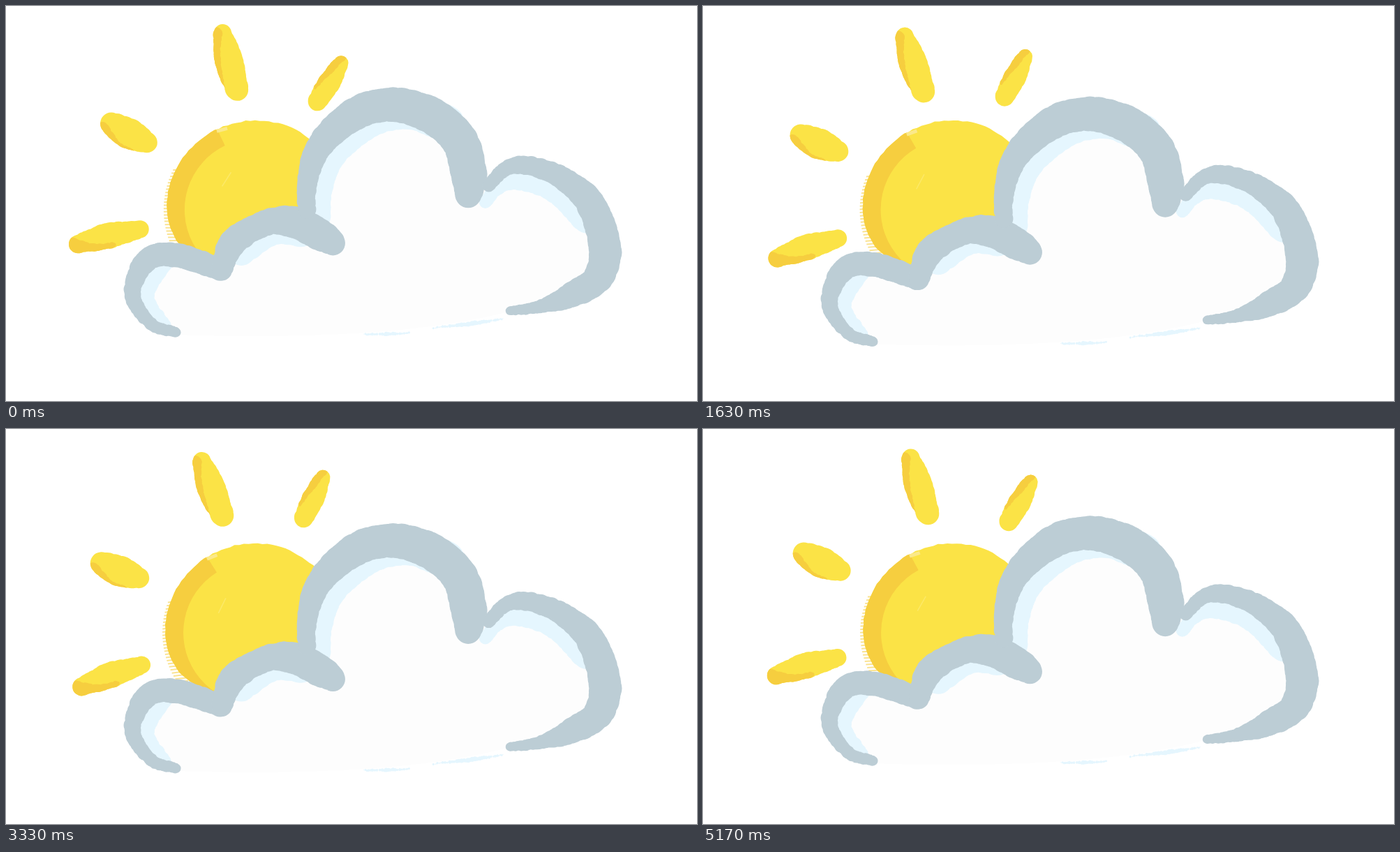
Write an HTML page with a canvas that moves like this. It is 990 by 566 pixels and loops after 5210 ms.

```html
<!DOCTYPE html>
<html lang="en">
<head>
<meta charset="utf-8">
<title>Sun and cloud</title>
<style>
html, body { margin: 0; width: 100%; height: 100%; overflow: hidden; background: #fff; }
canvas { display: block; }
</style>
</head>
<body>
<canvas id="stage" width="990" height="566"></canvas>
<script>
const ctx = document.getElementById('stage').getContext('2d');
const LOOP = 5210, SWING = 872, DROP = 52.4;
const YELLOW = '#fbe346', AMBER = '#f6ce3f', GRAY = '#bccdd5', ICE = '#e5f6fe', WHITE = '#fdfdfd';
const PIVOT = { x: 356, y: 308 };
const SUN = { x: 358, y: 292, r: 128 };

let seed = 7;
const rand = () => (seed = (seed * 16807) % 2147483647) / 2147483647;
const jitter = amount => (rand() * 2 - 1) * amount;

// Smooth curve through a, b, c, d, evaluated between b and c
const spline = (a, b, c, d, u) => b + 0.5 * u * (c - a
  + u * (2 * a - 5 * b + 4 * c - d + u * (3 * (b - c) + d - a)));

// Ragged brush stroke through key points [x, y, width]
function brush(keys) {
  const path = new Path2D();
  const at = i => keys[Math.max(0, Math.min(keys.length - 1, i))];
  for (let i = 0; i < keys.length - 1; i++) {
    const [a, b, c, d] = [at(i - 1), at(i), at(i + 1), at(i + 2)];
    const steps = Math.ceil(Math.hypot(c[0] - b[0], c[1] - b[1]) / 3);
    for (let s = 0; s <= steps; s++) {
      const [x, y, w] = [0, 1, 2].map(k => spline(a[k], b[k], c[k], d[k], s / steps));
      const r = Math.max(0.5, w / 2 + jitter(0.6)), cx = x + jitter(0.6), cy = y + jitter(0.6);
      path.moveTo(cx + r, cy);
      path.arc(cx, cy, r, 0, Math.PI * 2);
    }
  }
  return path;
}

// Nearly round disc, flattened at the lower left
function makeDisc() {
  const path = new Path2D();
  for (let deg = 0; deg < 360; deg += 3) {
    const r = SUN.r - 17 * Math.exp(-(((deg - 135) / 25) ** 2)) + jitter(0.8);
    const a = deg * Math.PI / 180;
    path.lineTo(SUN.x + r * Math.cos(a), SUN.y + r * Math.sin(a));
  }
  path.closePath();
  return path;
}

const disc = makeDisc();

const rays = [
  { body: [[312, 39, 25], [321, 78, 40], [333, 121, 31]],
    side: [[304, 38, 16], [300, 75, 18], [312, 118, 6]] },
  { body: [[482, 83, 21], [464, 112, 31], [447, 138, 26]],
    side: [[482, 72, 16], [455, 100, 14], [444, 118, 4]] },
  { body: [[152, 167, 32], [178, 182, 43], [204, 195, 28]],
    side: [[140, 172, 16], [158, 200, 16], [180, 208, 10]] },
  { body: [[103, 339, 25], [145, 328, 36], [192, 319, 24]],
    side: [[95, 340, 20], [125, 350, 22], [155, 340, 6]] }
].map(({ body, side }) => ({ body: brush(body), side: brush(side) }));

// Cloud outline, left to right
const tail = [[244, 466, 14], [208, 454, 18], [181, 410, 23], [203, 362, 32], [245, 356, 34], [306, 376, 32]];
const small = [[309, 378, 28], [325, 338, 38], [371, 310, 36], [411, 308, 45], [448, 325, 45], [468, 338, 36]];
const big = [[431, 292, 25], [432, 250, 29], [449, 200, 37], [500, 153, 46], [555, 140, 48],
  [610, 156, 52], [650, 192, 52], [663, 240, 51], [662, 270, 37]];
const right = [[692, 256, 18], [715, 232, 21], [745, 227, 26], [791, 242, 31], [837, 281, 41],
  [858, 345, 46], [848, 388, 42], [812, 412, 36], [770, 428, 20], [722, 436, 12]];

function makeInside() {
  const path = new Path2D();
  [...tail, ...small.slice(0, 4), ...big, ...right].forEach(([x, y]) => path.lineTo(x, y));
  path.quadraticCurveTo(560, 480, 244, 470);
  path.closePath();
  return path;
}

// Highlight: part of an outline stroke moved inward
const glow = (keys, from, to, dx, dy) =>
  brush(keys.slice(from, to).map(([x, y, w]) => [x + dx, y + dy, w]));

const inside = makeInside();
const ice = [
  glow(tail, 1, 4, 20, 3),
  glow(small, 1, 4, 12, 13),
  glow(big, 0, 6, 21, 11),
  glow(right, 0, 5, -5, 23),
  brush([[513, 469, 2], [545, 469, 5], [577, 467, 2]]),
  brush([[612, 460, 2], [665, 454, 6], [712, 447, 2]])
];
const outline = [tail, small, big, right].map(brush);

function fill(path, color) {
  ctx.fillStyle = color;
  ctx.fill(path);
}

function line(color, width, x1, y1, x2, y2) {
  ctx.strokeStyle = color;
  ctx.lineWidth = width;
  ctx.beginPath();
  ctx.moveTo(x1, y1);
  ctx.lineTo(x2, y2);
  ctx.stroke();
}

function inClip(path, draw) {
  ctx.save();
  ctx.clip(path);
  draw();
  ctx.restore();
}

function drawDisc() {
  // Dry-brush ticks on the left rim
  for (let y = 234; y < 372; y += 4.6) {
    const edge = SUN.x - Math.sqrt(SUN.r ** 2 - (y - SUN.y) ** 2);
    line('#fae392', 2, edge - 4, y, edge + 12, y);
  }
  fill(disc, YELLOW);
  inClip(disc, () => {
    ctx.strokeStyle = AMBER;
    ctx.lineWidth = 30;
    ctx.beginPath();
    ctx.arc(SUN.x, SUN.y, SUN.r - 11, Math.PI * 0.6, Math.PI * 1.36);
    ctx.stroke();
  });
  line('#fbe98a', 5, 303, 179, 318, 175);
  line('#fce968', 1.5, 310, 258, 323, 238);
}

function drawSun(angle) {
  ctx.save();
  ctx.translate(PIVOT.x, PIVOT.y);
  ctx.rotate(-angle);
  ctx.translate(-PIVOT.x, -PIVOT.y);
  drawDisc();
  for (const { body, side } of rays) {
    fill(body, YELLOW);
    inClip(body, () => fill(side, AMBER));
  }
  ctx.restore();
}

function drawCloud(drop) {
  ctx.save();
  ctx.translate(0, drop);
  fill(inside, WHITE);
  ice.forEach(path => fill(path, ICE));
  outline.forEach(path => fill(path, GRAY));
  ctx.restore();
}

function render(ms) {
  const t = Math.floor((ms % LOOP + 3.4) * 0.03) / 0.03;
  const phase = ((t - 15) / SWING + 1) % 1;
  const drop = DROP * (1 - Math.abs(1 - 2 * phase)) - 0.5;
  ctx.fillStyle = '#fff';
  ctx.fillRect(0, 0, 990, 566);
  drawSun(drop * 0.345 * Math.PI / 180);
  drawCloud(drop);
}

let start;
function tick(now) {
  start ??= now;
  render(Math.max(0, now - start));
  requestAnimationFrame(tick);
}
render(0);
requestAnimationFrame(tick);
</script>
</body>
</html>
```
